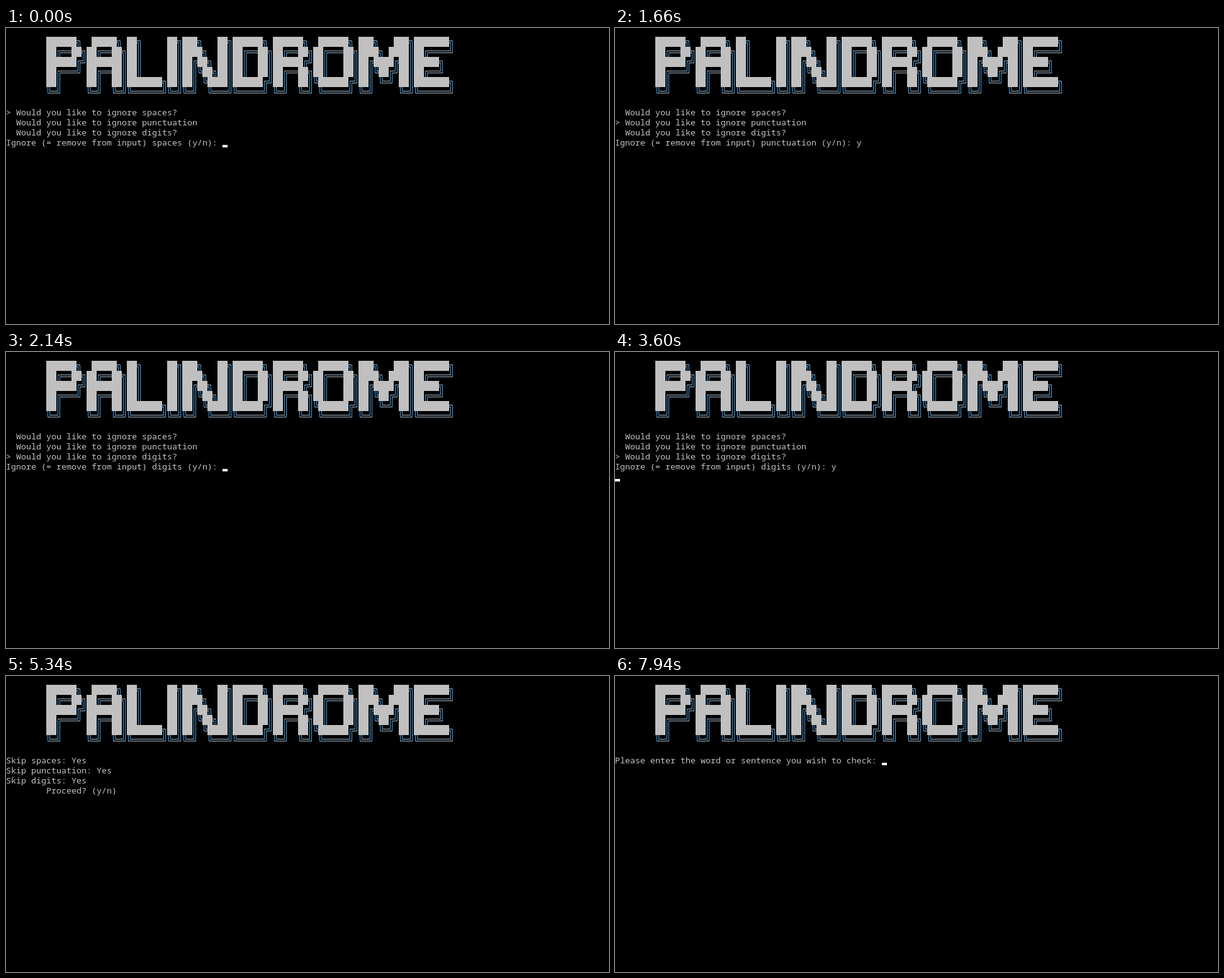
An HTML page with a canvas for the animation above (8000 ms loop, 958 by 471 pixels).

```html
<!DOCTYPE html>
<html lang="en">
<head>
<meta charset="utf-8">
<title>Palindrome console</title>
<style>
  html, body { margin: 0; width: 100%; height: 100%; overflow: hidden; background: #000; }
  canvas, pre, i { position: absolute; left: 0; }
  canvas { top: 14px; }
  pre { top: 126px; margin: 0; color: #c4c4c4;
        font: 13.3333px/16px "Noto Sans Mono", "DejaVu Sans Mono", monospace; }
  i { width: 8px; height: 4px; background: #fff; }
</style>
</head>
<body>
<canvas id="banner" width="958" height="96"></canvas>
<pre id="text"></pre>
<i id="cursor"></i>
<script>
const CELL_W = 8, CELL_H = 16, LOOP = 8000;
const banner = document.getElementById('banner');
const text = document.getElementById('text');
const cursor = document.getElementById('cursor');

const LOGO = [
  '██████╗  █████╗ ██╗     ██╗███╗   ██╗██████╗ ██████╗  ██████╗ ███╗   ███╗███████╗',
  '██╔══██╗██╔══██╗██║     ██║████╗  ██║██╔══██╗██╔══██╗██╔═══██╗████╗ ████║██╔════╝',
  '██████╔╝███████║██║     ██║██╔██╗ ██║██║  ██║██████╔╝██║   ██║██╔████╔██║█████╗  ',
  '██╔═══╝ ██╔══██║██║     ██║██║╚██╗██║██║  ██║██╔══██╗██║   ██║██║╚██╔╝██║██╔══╝  ',
  '██║     ██║  ██║███████╗██║██║ ╚████║██████╔╝██║  ██║╚██████╔╝██║ ╚═╝ ██║███████╗',
  '╚═╝     ╚═╝  ╚═╝╚══════╝╚═╝╚═╝  ╚═══╝╚═════╝ ╚═╝  ╚═╝ ╚═════╝ ╚═╝     ╚═╝╚══════╝'
];

// Double-line strokes within a cell: left/right columns and upper/lower rows.
const L = 2, R = 5, U = 6, D = 9;
const across = (y, x0, x1) => ['#a6bccc', x0, y, x1 - x0, 1];
const down = (x, y0, y1) => ['#4a9edc', x, y0, 1, y1 - y0];
const GLYPHS = {
  ' ': [],
  '█': [['#c0c0c0', 0, 0, CELL_W, CELL_H]],
  '═': [across(U, 0, 8), across(D, 0, 8)],
  '║': [down(L, 0, 16), down(R, 0, 16)],
  '╔': [across(U, L, 8), across(D, R, 8), down(L, U, 16), down(R, D, 16)],
  '╗': [across(U, 0, R + 1), across(D, 0, L + 1), down(R, U, 16), down(L, D, 16)],
  '╚': [across(D, L, 8), across(U, R, 8), down(L, 0, D + 1), down(R, 0, U + 1)],
  '╝': [across(D, 0, R + 1), across(U, 0, L + 1), down(R, 0, D + 1), down(L, 0, U + 1)]
};

const ctx = banner.getContext('2d');
LOGO.forEach((line, row) => [...line].forEach((char, col) => {
  for (const [color, x, y, w, h] of GLYPHS[char]) {
    ctx.fillStyle = color;
    ctx.fillRect((col + 8) * CELL_W + x, row * CELL_H + y, w, h);
  }
}));

const QUESTIONS = ['spaces?', 'punctuation', 'digits?'];
const ask = (index, name) => QUESTIONS
  .map((q, i) => `${i === index ? '>' : ' '} Would you like to ignore ${q}\n`)
  .join('') + `Ignore (= remove from input) ${name} (y/n): `;

const spaces = ask(0, 'spaces');
const punctuation = ask(1, 'punctuation');
const digits = ask(2, 'digits');
const confirm = 'Skip spaces: Yes\nSkip punctuation: Yes\nSkip digits: Yes\n        Proceed? (y/n) ';
const entry = 'Please enter the word or sentence you wish to check: ';

// [start in ms, screen text, cursor visible]; the cursor follows the text.
const STEPS = [
  [0, spaces, true],
  [70, spaces + 'y', true],
  [600, spaces + 'y', false],
  [800, punctuation, true],
  [1660, punctuation + 'y', false],
  [2070, '\n\n\n\n', true],
  [2140, digits, true],
  [2670, digits + 'y', true],
  [2740, digits + 'y', false],
  [3200, digits + 'y', true],
  [3600, digits + 'y\n', true],
  [3670, confirm, true],
  [4280, confirm, false],
  [4810, confirm, true],
  [5340, confirm, false],
  [5740, confirm + 'y', true],
  [5870, confirm + 'y', false],
  [6400, confirm + 'y', true],
  [6530, confirm + 'y\n', true],
  [6600, entry, true],
  [7480, entry, false],
  [7940, entry, true]
];

let shown;
function show(step) {
  if (step === shown) return;
  shown = step;
  const [, content, cursorOn] = step;
  const lines = content.split('\n');
  text.textContent = content;
  banner.style.visibility = content.trim() ? 'visible' : 'hidden';
  cursor.style.visibility = cursorOn ? 'visible' : 'hidden';
  cursor.style.left = lines.at(-1).length * CELL_W + 'px';
  cursor.style.top = 126 + lines.length * CELL_H - 4 + 'px';
}

const start = performance.now();
function tick() {
  const time = (performance.now() - start) % LOOP;
  show(STEPS.findLast(([from]) => from <= time));
  requestAnimationFrame(tick);
}
tick();
</script>
</body>
</html>
```
